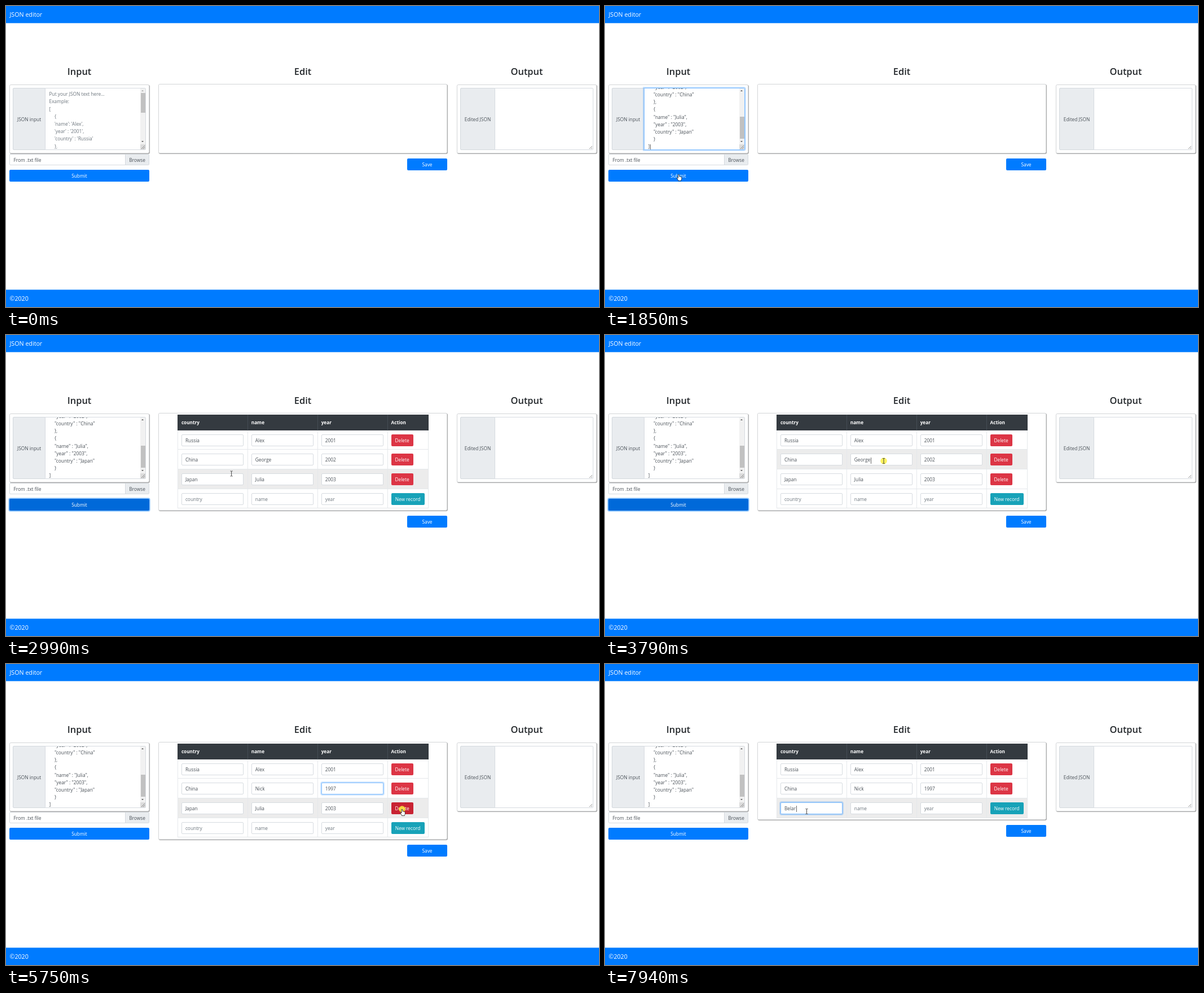
An HTML page for the animation above (8000 ms loop, 1051 by 533 pixels).

```html
<!DOCTYPE html>
<html lang="en">
<head>
<meta charset="utf-8">
<title>JSON editor</title>
<style>
  * { box-sizing: border-box; }
  html, body { margin: 0; width: 100%; height: 100%; overflow: hidden; background: #fff; }
  body { position: relative; font: 8.35px/13.2px "Open Sans", "Noto Sans", sans-serif; color: #495057; cursor: default; }
  .abs, .field, .cell, .btn, .vline { position: absolute; white-space: nowrap; }
  .bar { left: 0; width: 1051px; height: 31px; line-height: 31px; background: #007bff content-box; color: #fff;
         font-size: 10.7px; text-indent: 6.5px; }
  h2 { position: absolute; top: 103px; margin: 0; width: 248px; text-align: center;
       font-size: 16.4px; line-height: 25px; font-weight: 600; color: #212529; }
  .card { border: 1px solid #d4d6d8; border-radius: 2.5px; box-shadow: .7px .7px .8px #8c8c8c; background: #fff; }
  .label { background: #e9ecef; border: 1px solid #d3d8dd; border-radius: 2px 0 0 2px; text-align: center; line-height: 109px; }
  .field { --f: 0; background: #fff; border-radius: 2px;
           border: 1px solid color-mix(in srgb, #80bdff calc(var(--f) * 100%), #d6dbe0);
           box-shadow: 0 0 0 1.75px rgba(0, 123, 255, calc(.25 * var(--f))); }
  .area { overflow: hidden; border-radius: 0 2px 2px 0; }
  .text { position: absolute; left: 6.5px; white-space: pre; tab-size: 9.4px; }
  .ph { color: #6c757d; }
  .btn { --f: 0; background: #007bff; color: #fff; border-radius: 2px; text-align: center; height: 21px; line-height: 21px;
         box-shadow: 0 0 0 1.75px rgba(38, 143, 255, calc(.5 * var(--f))); }
  .caret { display: inline-block; width: 1px; height: 11px; margin: 0 -1.5px 0 .5px; vertical-align: middle; background: #666; }
  .sel { background: #0078d7; color: #fff; }
  #edit { left: 270px; top: 138px; width: 512px; }
  #editCard { min-height: 123px; padding: 2px 0 2.3px 33px; }
  #table { position: relative; width: 445px; }
  .head { height: 27.6px; background: #343a40; color: #fff; font-weight: 700; font-size: 8.2px; line-height: 28px; }
  .row { position: relative; height: 34.67px; box-shadow: inset 0 -1px #e5e8eb; }
  .cell { top: 0; }
  .row .field { top: 7.2px; width: 110.5px; height: 21px; line-height: 20px; padding-left: 6px; }
  .row .btn { left: 378.5px; top: 7.2px; }
  .vline { top: 27.6px; bottom: 0; width: 1px; background: #e5e8eb; }
  .hline { top: 0; height: 27.6px; background: #454d55; }
  .up, .down { position: absolute; left: 2.2px; border: 2.3px solid transparent; }
  .up { top: 1px; border-bottom-color: #505050; }
  .down { bottom: 2px; border-top-color: #505050; }
  #cursor { position: absolute; left: 0; top: 0; width: 1px; height: 1px; overflow: visible; }
</style>
</head>
<body>
<div class="abs bar" style="top:0;border-bottom:1px solid #a6d0ff">JSON editor</div>
<div class="abs bar" style="top:502px;border-top:1px solid #59a9ff">©2020</div>
<h2 style="left:6px">Input</h2>
<h2 style="left:402px">Edit</h2>
<h2 style="left:799px">Output</h2>

<div class="abs card" style="left:6px;top:139px;width:247.5px;height:122px"></div>
<div class="abs label" style="left:12px;top:145px;width:58px;height:110px">JSON input</div>
<div class="field area" id="source" style="left:69px;top:145px;width:179px;height:110px">
  <div class="text" id="json"></div>
  <div class="abs" style="right:0;top:0;width:9px;height:99px;background:#f1f1f1">
    <i class="up" id="up"></i><i class="down"></i>
    <div class="abs" id="thumb" style="left:.5px;width:8px;background:#c1c1c1"></div>
  </div>
  <svg class="abs" style="right:0;bottom:0;background:#dcdcdc" width="9" height="9"><path d="M2 8L8 2M5 8L8 5" stroke="#777" stroke-width=".8"/></svg>
</div>
<div class="field" style="left:6px;top:261.5px;width:248px;height:20.5px;line-height:19px;padding-left:6.5px">From .txt file
  <span class="abs" style="right:0;top:0;width:42px;height:18.5px;background:#e9ecef;border-left:1px solid #d6dbe0;text-align:center">Browse</span>
</div>
<div class="btn" id="submit" style="left:6px;top:290px;width:248px">Submit</div>

<div class="abs" id="edit">
  <div class="card" id="editCard"><div id="table"></div></div>
  <div class="btn" style="right:0;bottom:-30px;width:71px">Save</div>
</div>

<div class="abs card" style="left:799px;top:139px;width:247.5px;height:122px"></div>
<div class="abs label" style="left:805px;top:145px;width:62px;height:110px">Edited JSON</div>
<div class="field area" style="left:866px;top:145px;width:174.5px;height:110px">
  <svg class="abs" style="right:0;bottom:0" width="7" height="7"><path d="M1 6L6 1M4 6L6 4" stroke="#777" stroke-width=".8"/></svg>
</div>

<svg id="cursor">
  <circle id="click" r="5.8" fill="#fdf13a" opacity=".8"/>
  <path id="arrow" d="M0 0V9.5L2.2 7.5L3.7 10.8L5.2 10.1L3.8 7H6.8Z" fill="#fff" stroke="#000" stroke-width=".7"/>
  <path id="beam" d="M-2-4.5H-.6L0-4L.6-4.5H2M0-4V4M-2 4.5H-.6L0 4L.6 4.5H2" fill="none" stroke="#333" stroke-width=".9"/>
  <path id="hand" d="M-1 .8Q0-.4 1 .8V4Q2 3.3 2.7 4.3Q3.7 3.8 4.2 4.8Q5.3 4.5 5.4 5.7V8Q5.2 9.5 4.4 10.4V11.6H-.6V10.6L-3.2 7Q-3.4 5.6-2.2 5.9L-1 7Z" fill="#fff" stroke="#000" stroke-width=".7"/>
</svg>

<script>
const $ = id => document.getElementById(id);
const clamp = v => Math.max(0, Math.min(1, v));
const columns = ["country", "name", "year"];
const people = [["Russia", "Alex", "2001"], ["China", "George", "2002"], ["Japan", "Julia", "2003"]];

// Screen refreshes come in bursts: start, end, number of steps.
const bursts = [[30, 830, 9], [1030, 1750, 9], [1850, 2590, 9], [2690, 3490, 9], [3590, 4360, 12], [4460, 4460, 1],
  [4680, 5450, 11], [5550, 6350, 9], [6450, 7250, 9], [7350, 7940, 9]];

// Pointer stops: time, x, y.
const path = [[30, 872, 487], [600, 172, 212], [1400, 172, 212], [1850, 130.5, 298], [2250, 130.5, 298],
  [2590, 330, 262], [3480, 494, 223], [4640, 494, 223], [4911, 380, 231], [5000, 380, 232],
  [5430, 702, 257], [5900, 702, 257], [6350, 702.5, 261], [6450, 702.5, 261], [7230, 357.5, 261]];

const clicks = [[620, 760], [2010, 2100], [3660, 3860], [5710, 5840], [7350, 7430]];
const PASTE = 1300, LOAD = 2100, DELETE = 5840;

const nameKeys = [[0, "George"], [3800, "Geor"], [3870, "Ge"], [3940, ""], [4080, "N"], [4150, "Ni"], [4220, "Nic"], [4290, "Nick"]];
const yearKeys = [[0, "2002"], [4680, "1"], [4757, "19"], [4834, "199"], [4911, "1997"]];
const countryKeys = [[0, ""], [7560, "B"], [7640, "Be"], [7710, "Bel"], [7790, "Bela"], [7860, "Belar"]];

function makeTable() {
  const edge = i => 6.9 + i * 123.9;
  const heads = [...columns, "Action"].map((h, i) => `<span class="cell" style="left:${edge(i)}px">${h}</span>`).join("");
  const row = (button, color, width) => `<div class="row">` +
    columns.map((c, i) => `<div class="field" style="left:${edge(i)}px"></div>`).join("") +
    `<div class="btn" style="width:${width}px;background:${color}">${button}</div></div>`;
  const lines = [0, 124, 248, 372, 444].map((x, i) => `<i class="vline" style="left:${x}px"></i>` +
    (i % 4 ? `<i class="vline hline" style="left:${x}px"></i>` : "")).join("");
  $("table").innerHTML = `<div class="head">${heads}</div>` + row("Delete", "#dc3545", 39).repeat(3) +
    row("New record", "#17a2b8", 59) + lines;
}
makeTable();
const rows = [...document.querySelectorAll(".row")];
const fields = rows.map(r => [...r.querySelectorAll(".field")]);

function jsonText(list) {
  const items = list.map(([country, name, year]) =>
    `\t{\n\t"name" : "${name}",\n\t"year" : "${year}",\n\t"country" : "${country}"\n\t}`);
  return `[\n${items.join(",\n")}\n]`;
}
const example = "Put your JSON text here...\nExample:\n" +
  jsonText(people).replace(/"/g, "'").replace(/'name' :/g, "'name':");
const pasted = jsonText(people);

function refresh(t) {
  let q = 0;
  for (const [a, b, n] of bursts) {
    if (t < a) break;
    const step = (b - a) / (n - 1 || 1) || 1;
    q = Math.min(b, a + Math.floor((t - a) / step + 1e-6) * step);
  }
  return q;
}

const latest = (keys, q) => keys.filter(k => k[0] <= q + .5).pop()[1];

function position(q) {
  const i = path.findIndex(k => k[0] > q);
  if (i < 0) return path[path.length - 1].slice(1);
  if (!i) return path[0].slice(1);
  const [ta, xa, ya] = path[i - 1], [tb, xb, yb] = path[i];
  const u = (q - ta) / (tb - ta), e = u * u * (3 - 2 * u);
  return [xa + (xb - xa) * e, ya + (yb - ya) * e];
}

function focus(el, q, from, to) {
  el.style.setProperty("--f", clamp((q - from) / 150) * (1 - clamp((q - to) / 150)));
}

function put(el, value, hint, caret, selected) {
  const html = (caret && !value ? '<i class="caret"></i>' : "") +
    `<span class="${value ? selected ? "sel" : "" : "ph"}">${value || hint}</span>` +
    (caret && value ? '<i class="caret"></i>' : "");
  if (el.dataset.html !== html) el.innerHTML = el.dataset.html = html;
}

function drawInput(q) {
  const full = q >= PASTE;
  const on = q >= 630 && q < LOAD && (full || q % 1060 > 500);
  put($("json"), full ? pasted : "", example, on);
  $("json").style.top = (full ? 31.2 : 149.1) - 146 + "px";
  $("thumb").style.top = (full ? 50 : 8) + "px";
  $("thumb").style.height = (full ? 38.5 : 35) + "px";
  $("up").style.borderBottomColor = full ? "#505050" : "#a3a3a3";
  focus($("source"), q, 630, LOAD);
  focus($("submit"), q, LOAD, 3731);
  $("submit").style.background = q > 1860 && q < 3740 ? "#0069d9" : "#007bff";
}

function drawTable(q, x, y) {
  const shown = q >= LOAD, gone = q >= DELETE;
  $("table").style.display = shown ? "" : "none";
  rows[2].style.display = gone ? "none" : "";
  const slot = x > 304 && x < 749 ? Math.floor((y - 168.7) / 34.67) : -1;
  const hover = gone && slot === 2 ? 3 : slot;
  const inside = shown && hover >= 0 && hover < 4;
  const dy = y - 168.7 - slot * 34.67, inBand = inside && dy > 7 && dy < 28.2;
  const overButton = inBand && x > 682 && x < (hover === 3 ? 742 : 722);
  const overField = inBand && x > 311 && x < 669 && (x - 311) % 123.9 < 110;

  rows.forEach((row, r) => {
    const hot = inside && hover === r;
    row.style.background = hot ? "#ececec" : "";
    const base = r < 3 ? ["#dc3545", "#c82333"] : ["#17a2b8", "#138496"];
    row.querySelector(".btn").style.background = base[+(hot && overButton)];
    columns.forEach((c, i) => {
      const typed = (r === 1 && i > 0) || (r === 3 && i === 0);
      if (!typed) put(fields[r][i], r < 3 ? people[r][i] : "", c);
    });
  });
  put(fields[1][1], latest(nameKeys, q), "name", q >= 3729 && q < 4359);
  put(fields[1][2], latest(yearKeys, q), "year", false, q >= 4359 && q < 4679);
  put(fields[3][0], latest(countryKeys, q), "country", q >= 7350);
  focus(fields[1][1], q, 3731, 4360);
  focus(fields[1][2], q, 4360, 5740);
  focus(fields[3][0], q, 7350, 9000);
  return overButton ? "hand" : overField ? "beam" : "arrow";
}

function draw(t) {
  const q = refresh(t), [x, y] = position(q);
  let kind = drawTable(q, x, y);
  drawInput(q);
  if (x > 70 && x < 238 && y > 145 && y < 255) kind = "beam";
  if (x > 6 && x < 254 && y > 290 && y < 311) kind = "hand";
  for (const k of ["arrow", "beam", "hand"]) $(k).style.display = k === kind ? "" : "none";
  $("click").style.display = clicks.some(([a, b]) => q >= a && q < b) ? "" : "none";
  $("cursor").style.display = q ? "" : "none";
  $("cursor").style.transform = `translate(${x}px, ${y}px)`;
}

function loop() {
  draw(performance.now() % 8000);
  requestAnimationFrame(loop);
}
loop();
</script>
</body>
</html>
```
